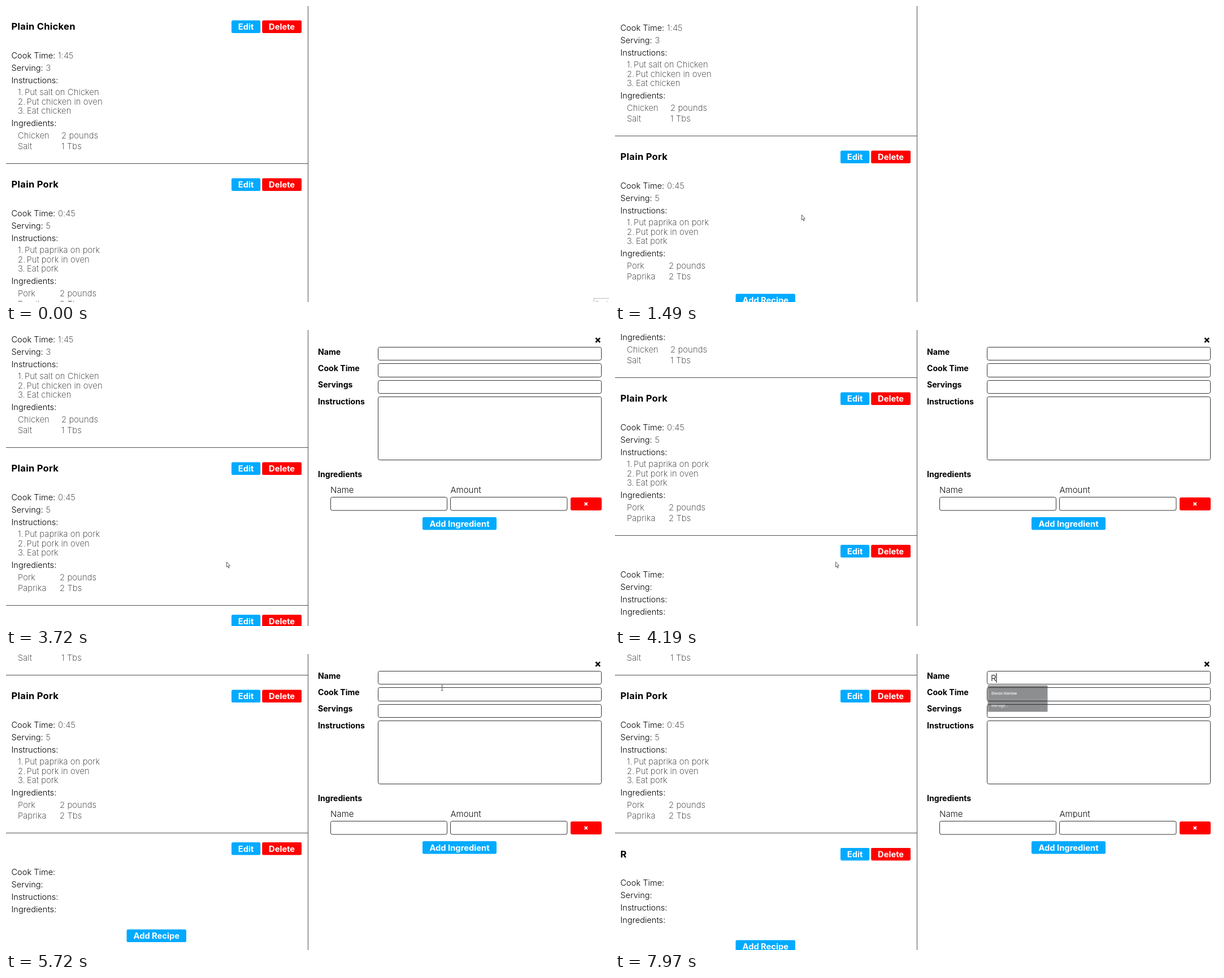
An HTML page for the animation above (8 s loop, 1067 px wide and 525 px high).

```html
<!DOCTYPE html>
<html lang="en">
<head>
<meta charset="utf-8">
<title>Recipe editor</title>
<style>
html, body { margin: 0; width: 100%; height: 100%; overflow: hidden; background: #fff; }
svg { display: block; width: 1067px; height: 525px; font-family: Inter, sans-serif; }
.title { font-size: 16.6px; font-weight: 700; letter-spacing: .25px; }
.label { font-size: 14.6px; font-weight: 350; }
.thin { font-size: 14.8px; font-weight: 250; fill: #222; letter-spacing: .1px; }
.field { font-size: 14.1px; font-weight: 700; }
.col { font-size: 15px; font-weight: 350; fill: #111; }
.btn text { font-size: 14.7px; font-weight: 700; fill: #fff; text-anchor: middle; }
.line { fill: #505050; }
.input { fill: #fff; stroke: #333; }
.blue { fill: #0af; }
.red { fill: #f00; }
.menu { font-family: "Open Sans", sans-serif; font-size: 6.8px; fill: #fff; }

.a { animation: 8s step-end infinite; }
.list { animation-name: scroll; }
.opened { animation-name: opened; }
.typed { animation-name: typed; }
.add { animation-name: add; }
.add rect { animation: hover 8s step-end infinite; }
.head { animation-name: head; }
.rows { animation-name: rows; }
.tip { animation-name: tip; }
.caret { animation-name: caret; }
.arrow { animation-name: arrow; }
.hand { animation-name: hand; }
.beam { animation-name: beam; }
.cursor { animation: move 8s linear infinite; }
.menu { animation: menu 8s linear infinite; transform-box: fill-box; transform-origin: center; }

@keyframes scroll {
  0% { transform: translateY(0); }
  16.75% { transform: translateY(-7px); }
  17.625% { transform: translateY(-28px); }
  18.6% { transform: translateY(-49px); }
  19.375% { transform: translateY(-61px); }
  20.25% { transform: translateY(-67px); }
  21.125% { transform: translateY(-70px); }
  22% { transform: translateY(-71px); }
  50.625% { transform: translateY(-95px); }
  51.5% { transform: translateY(-150px); }
  52.25% { transform: translateY(-195px); }
  53.125% { transform: translateY(-222px); }
  54% { transform: translateY(-235px); }
  54.75% { transform: translateY(-240px); }
  58.98% { transform: translateY(-241px); }
  59.875%, 100% { transform: translateY(-242px); }
}
@keyframes opened { 0% { opacity: 0; } 35.375%, 100% { opacity: 1; } }
@keyframes typed { 0% { opacity: 0; } 98.75%, 100% { opacity: 1; } }
@keyframes add {
  0% { transform: translateY(0); }
  35.375% { transform: translateY(171px); }
  98.75%, 100% { transform: translateY(190px); }
}
@keyframes hover { 0% { fill: #0af; } 28% { fill: #08c; } 35.375%, 100% { fill: #0af; } }
@keyframes head { 0% { transform: translateY(0); } 98.75%, 100% { transform: translateY(9.5px); } }
@keyframes rows { 0% { transform: translateY(0); } 98.75%, 100% { transform: translateY(19px); } }
@keyframes tip { 0% { opacity: 1; } .875%, 100% { opacity: 0; } }
@keyframes caret {
  0% { opacity: 0; }
  73.25% { opacity: 1; }
  82.98% { opacity: 0; }
  89.625% { opacity: 1; }
  95.375% { opacity: 0; }
  98.75%, 100% { opacity: 1; transform: translateX(10.5px); }
}
@keyframes arrow {
  0% { opacity: 0; }
  5.75% { opacity: 1; }
  28% { opacity: 0; }
  37% { opacity: 1; }
  67%, 100% { opacity: 0; }
}
@keyframes hand { 0% { opacity: 0; } 28% { opacity: 1; } 37%, 100% { opacity: 0; } }
@keyframes beam { 0% { opacity: 0; } 67%, 100% { opacity: 1; } }
@keyframes move {
  0%, 5.75% { transform: translate(866px, 504px); }
  7.5% { transform: translate(640px, 440px); }
  9% { transform: translate(420px, 392px); }
  10.6% { transform: translate(303px, 374px); }
  12.5%, 24.375% { transform: translate(330px, 370px); }
  25.1% { transform: translate(337px, 378px); }
  26.1% { transform: translate(309px, 423px); }
  28% { transform: translate(268px, 482px); }
  30% { transform: translate(262px, 494px); }
  33.75%, 41.2% { transform: translate(276px, 500px); }
  42.3% { transform: translate(300px, 470px); }
  43.5% { transform: translate(420px, 395px); }
  44.6% { transform: translate(508px, 367px); }
  45.6% { transform: translate(440px, 388px); }
  46.5%, 62.5% { transform: translate(390px, 411px); }
  65% { transform: translate(560px, 330px); }
  67.5% { transform: translate(900px, 200px); }
  69% { transform: translate(1040px, 120px); }
  70.5% { transform: translate(850px, 70px); }
  72.375%, 78.6% { transform: translate(705px, 52px); }
  80.5% { transform: translate(740px, 140px); }
  82% { transform: translate(800px, 260px); }
  83%, 100% { transform: translate(812px, 285px); }
}
@keyframes menu {
  0%, 73.2% { opacity: 0; transform: scale(.97); }
  73.25% { opacity: .2; transform: scale(.97); }
  77.125%, 99% { opacity: 1; transform: none; }
  99.6%, 100% { opacity: .53; transform: scale(.98); }
}
</style>
</head>
<body>
<svg id="stage" viewBox="0 0 1067 525"></svg>
<script>
const text = (cls, x, y, s) => `<text class="${cls}" x="${x}" y="${y}">${s}</text>`;
const input = (x, y, w, h) =>
  `<rect class="input" x="${x}" y="${y}" width="${w}" height="${h}" rx="3"/>`;
const button = (color, x, y, w, s) =>
  `<g class="btn"><rect class="${color}" x="${x}" y="${y}" width="${w}" height="22.5" rx="2.5"/>` +
  `<text x="${x + w / 2}" y="${y + 16.5}">${s}</text></g>`;
const cross = (x, y, r, color, w) =>
  `<path d="M${x - r} ${y - r}l${2 * r} ${2 * r}m0 ${-2 * r}l${-2 * r} ${2 * r}" stroke="${color}" stroke-width="${w}"/>`;
const actions = y => button("blue", 399, y, 51.2, "Edit") + button("red", 453.2, y, 69.8, "Delete");
const rule = y => `<rect class="line" y="${y}" width="535" height="1"/>`;

function recipe(top, r) {
  const steps = r.steps.map((s, i) =>
    text("thin", 21, 158.4 + 16.4 * i, `${i + 1}.`) +
    text("thin", [33, 36.5, 37][i], 158.4 + 16.4 * i, s));
  const items = r.items.map(([name, amount], i) =>
    text("thin", 21, 234.5 + 19 * i, name) + text("thin", r.col, 234.5 + 19 * i, amount));
  return `<g transform="translate(0 ${top})">` +
    text("title", 9.5, 42.3, r.name) + actions(25.5) +
    text("label", 9.5, 93, "Cook Time:") + text("thin", 92, 93, r.time) +
    text("label", 9.5, 115, "Serving:") + text("thin", 70.5, 115, r.serves) +
    text("label", 9.5, 137, "Instructions:") + steps.join("") +
    text("label", 9.5, 213, "Ingredients:") + items.join("") +
    rule(279) + "</g>";
}

const chicken = {
  name: "Plain Chicken", time: "1:45", serves: 3, col: 98,
  steps: ["Put salt on Chicken", "Put chicken in oven", "Eat chicken"],
  items: [["Chicken", "2 pounds"], ["Salt", "1 Tbs"]]
};
const pork = {
  name: "Plain Pork", time: "0:45", serves: 5, col: 95,
  steps: ["Put paprika on pork", "Put pork in oven", "Eat pork"],
  items: [["Pork", "2 pounds"], ["Paprika", "2 Tbs"]]
};

const blank = `<g class="a opened"><rect y="559" width="534" height="200" fill="#fff"/>${rule(559)}
  <g class="a head">${actions(576)}</g>
  <g class="a typed">${text("title", 9.5, 602.5, "R")}</g>
  <g class="a rows">${["Cook Time:", "Serving:", "Instructions:", "Ingredients:"]
    .map((s, i) => text("label", 9.5, 634 + 22 * i, s)).join("")}</g></g>`;

// The last rule only shows once a third recipe follows it.
const list = `<g class="a list">${recipe(0, chicken)}${recipe(280, pork)}
  <rect y="558" width="534" height="3" fill="#fff"/>${blank}
  <g class="a add">${button("blue", 213.5, 559.5, 105.5, "Add Recipe")}</g></g>`;

const labels = [["Name", 43.5], ["Cook Time", 73], ["Servings", 102], ["Instructions", 131.5], ["Ingredients", 260.5]];
const form = `<g class="a opened">${cross(1047.3, 18, 3.8, "#000", 2.6)}
  ${labels.map(([s, y]) => text("field", 552, y, s)).join("")}
  ${input(658.5, 30.5, 395, 23)}${input(658.5, 59.5, 395, 24)}${input(658.5, 89.5, 395, 23)}
  ${input(658.5, 118.5, 395, 112)}
  ${text("col", 574, 288.5, "Name")}${text("col", 786.5, 288.5, "Amount")}
  ${input(574.5, 296.5, 206, 23.5)}${input(786.5, 296.5, 206.5, 23.5)}
  <rect class="red" x="999" y="297" width="55" height="23" rx="3"/>${cross(1026.3, 308.6, 2.6, "#fff", 1.9)}
  ${button("blue", 737, 332, 131, "Add Ingredient")}</g>
  <g class="a typed">${text("col", 665, 48, "R")}</g>
  <rect class="a caret" x="664" y="34" width="1" height="17"/>`;

const menu = `<g class="menu"><rect x="658.5" y="55" width="108" height="48" rx="1" fill="#292a2d"/>
  <rect x="658.5" y="79.5" width="108" height="1" fill="#3c3d41"/>
  <text x="665" y="72.3" font-weight="600">Devon Harlow</text>
  <text x="665" y="94">Manage...</text></g>`;

const tip = `<g class="a tip"><rect x="1040.5" y="518.5" width="40" height="20" fill="#fff" stroke="#bbb"/>
  <text x="1044" y="529" font-size="7" fill="#777">Search</text></g>`;

const cursor = `<g class="cursor">
  <path class="a arrow" d="M.4 .4V9.4L2.3 7.6L3.9 11.2L5.2 10.6L3.7 7.1H6.4Z" fill="#fff" stroke="#333" stroke-width=".8"/>
  <path class="a hand" d="M-1 0Q0-1 1 0V5L5 6Q7 6 7 8V11L5 15H-1L-5 9Q-4 7-1 9Z" fill="#fff" stroke="#222" stroke-width=".8"/>
  <path class="a beam" d="M-2-4.5H-.5L0-4L.5-4.5H2M0-4V4M-2 4.5H-.5L0 4L.5 4.5H2" fill="none" stroke="#444" stroke-width=".9"/></g>`;

document.getElementById("stage").innerHTML =
  list + '<rect class="line" x="534" width="1" height="525"/>' + form + menu + tip + cursor;
</script>
</body>
</html>
```
